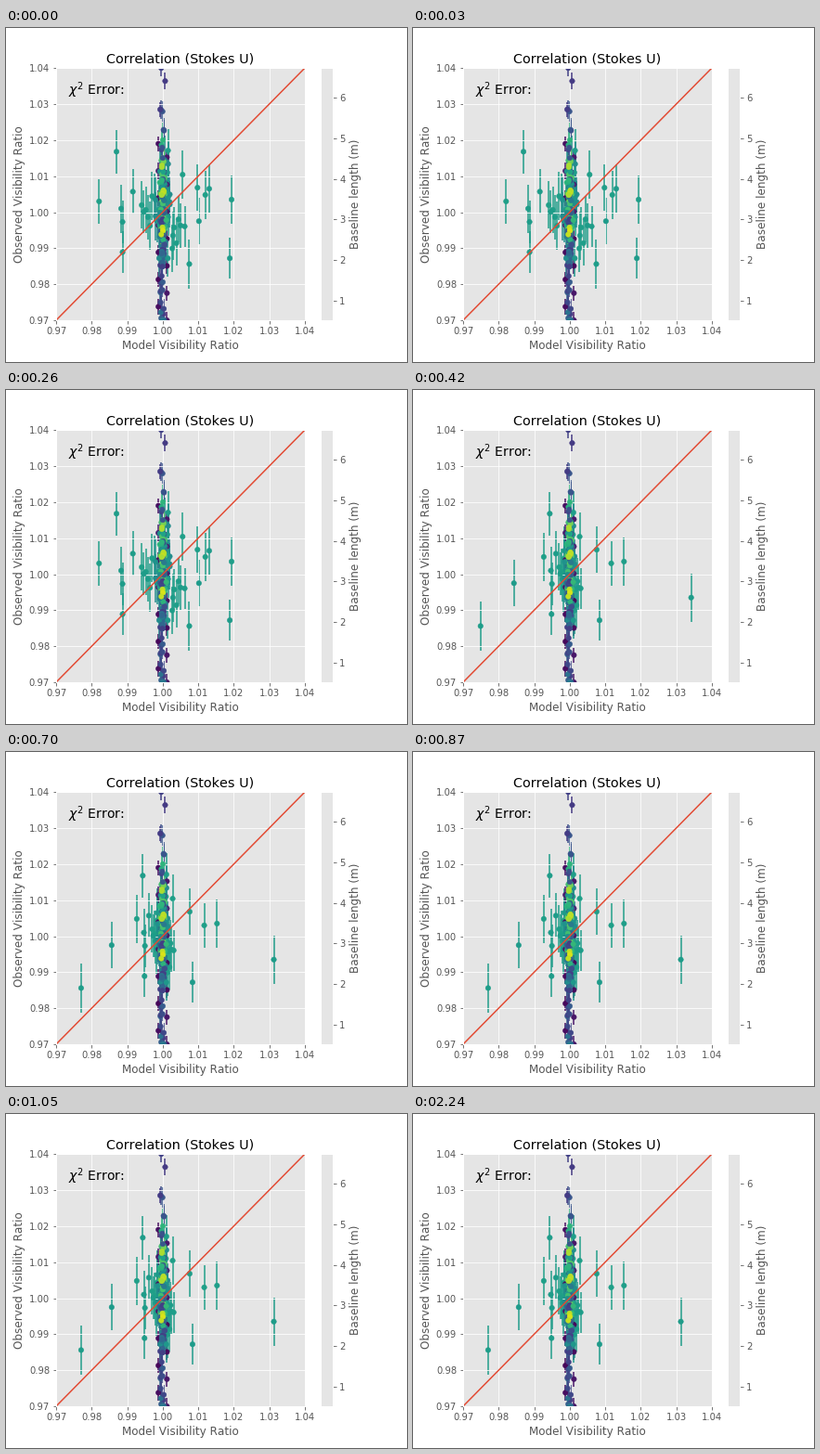
Animation, 432 px wide and 360 px high, one loop 3030 ms. Source, as a matplotlib script:

```python
import numpy as np
import matplotlib.pyplot as plt
from matplotlib.animation import FuncAnimation
from matplotlib.collections import LineCollection

plt.style.use("ggplot")
plt.rcParams.update({"font.family": "DejaVu Sans", "font.size": 10,
                     "text.kerning_factor": 6})

FRAMES, INTERVAL = 101, 30
FIT_STEP = 14
LOW, HIGH = 0.97, 1.04
B_MIN, B_MAX = 0.52, 6.73

# Widest points: y, first fit x, second fit x (1e-3 away from unity)
WIDE = np.array([
    (16.8, -13.0, -5.6), (3.0, -17.9, 11.7), (5.7, -8.4, -3.9),
    (1.0, -11.7, -5.3), (-2.7, -11.3, -5.0), (-11.1, -11.3, -5.1),
    (6.8, 9.8, 7.6), (6.5, 13.1, -1.5), (4.8, 12.0, -7.3),
    (3.5, 19.4, 15.3), (-12.8, 18.9, 8.4), (-14.4, 7.5, -25.1),
    (-2.5, 10.2, -15.7), (-6.5, 2.9, 34.2),
])

rng = np.random.default_rng(12)


def group(y, x, lengths, errors, shrink=1.0):
    """Rows: y, first x, second x, baseline length, error."""
    n = len(y)
    return np.array([y, x, x * shrink,
                     rng.uniform(*lengths, n), rng.uniform(*errors, n)])


def cloud(n, center, spread, width, lengths, errors, shrink=1.0):
    y = np.clip(rng.normal(center, spread, n), -30, 28.5)
    x = np.clip(rng.normal(0, width, n), -2 * width, 2 * width)
    return group(y, x, lengths, errors, shrink)


def build():
    wide = group(WIDE[:, 0], WIDE[:, 1], (3.9, 4.0), (5.6, 6.8))
    wide[2] = WIDE[:, 2]

    # Moderate outliers and very short baselines alternate left and right
    side = np.resize([-1, 1], 14)
    medium = group(rng.normal(-0.5, 6, 14), side * np.linspace(2.4, 6.2, 14),
                   (3.9, 4.0), (5.6, 6.8), shrink=0.5)
    short = group(np.linspace(19, -30, 14), 1.2 * side, (0.6, 1.0), (2, 2.3))
    top = group(np.array([36.4, 40.0]), np.array([0.7, -0.4]),
                (1.4, 1.8), (2, 2.3))

    core = np.hstack([
        cloud(55, 0, 17, 0.35, (1.6, 2.3), (2, 4)),
        cloud(40, -8, 9, 0.4, (2.3, 3.1), (3, 4.5)),
        cloud(40, 1, 7.5, 1.0, (3.5, 4.1), (5, 7), shrink=0.7),
        cloud(45, 4, 6, 0.5, (4.3, 5.5), (3, 5)),
    ])
    core = rng.permutation(core, axis=1)
    yellow = [cloud(n, center, 1.1, 0.2, (5.9, 6.6), (2, 3))
              for center, n in ((13.5, 2), (5, 7), (-6.5, 3))]
    return np.hstack([wide, medium, short, top, core, *yellow])


y, x_first, x_second, length, err = build()
# The next fit pulls the farthest points back a little
x_final = np.where(np.abs(x_second) > 15.5, x_second * 0.915, x_second)
y, err = 1 + y / 1000, err / 1000
colors = plt.cm.viridis((length - B_MIN) / (B_MAX - B_MIN))

fig = plt.figure(figsize=(6, 5), dpi=72, facecolor="white")
ax = fig.add_axes([0.125, 0.125, 0.62, 0.755])
ax.set(xlim=(LOW, HIGH), ylim=(LOW, HIGH),
       xlabel="Model Visibility Ratio", ylabel="Observed Visibility Ratio")
ax.set_title("Correlation (Stokes U)")
ticks = np.linspace(LOW, HIGH, 8)
labels = [f"{t:.2f}" for t in ticks]
ax.set_xticks(ticks, labels)
ax.set_yticks(ticks, labels)
ax.text(0.05, 0.895, r"$\chi^2$ Error:", transform=ax.transAxes, fontsize=14)

bars = LineCollection([], colors=colors, linewidths=1.5, zorder=0)
ax.add_collection(bars, autolim=False)
dots = ax.scatter(np.ones_like(y), y, s=30, c=colors, zorder=1)
ax.plot([LOW, HIGH], [LOW, HIGH], color="#E24A33", lw=1.5, zorder=2)

cax = fig.add_axes([0.78375, 0.125, 0.03146, 0.755])
cax.grid(False)
cax.set(xticks=[], ylim=(B_MIN, B_MAX), yticks=range(1, 7))
cax.yaxis.tick_right()
cax.yaxis.set_label_position("right")
cax.set_ylabel("Baseline length (m)")


def update(i):
    if i < FIT_STEP:
        offset = x_first
    else:
        offset = x_second if i == FIT_STEP else x_final
    x = 1 + offset / 1000
    dots.set_offsets(np.column_stack([x, y]))
    ends = [np.column_stack([x, y + s * err]) for s in (-1, 1)]
    bars.set_segments(np.stack(ends, axis=1))
    return bars, dots


anim = FuncAnimation(fig, update, frames=FRAMES, interval=INTERVAL,
                     repeat=True, repeat_delay=0)
plt.show()
```
